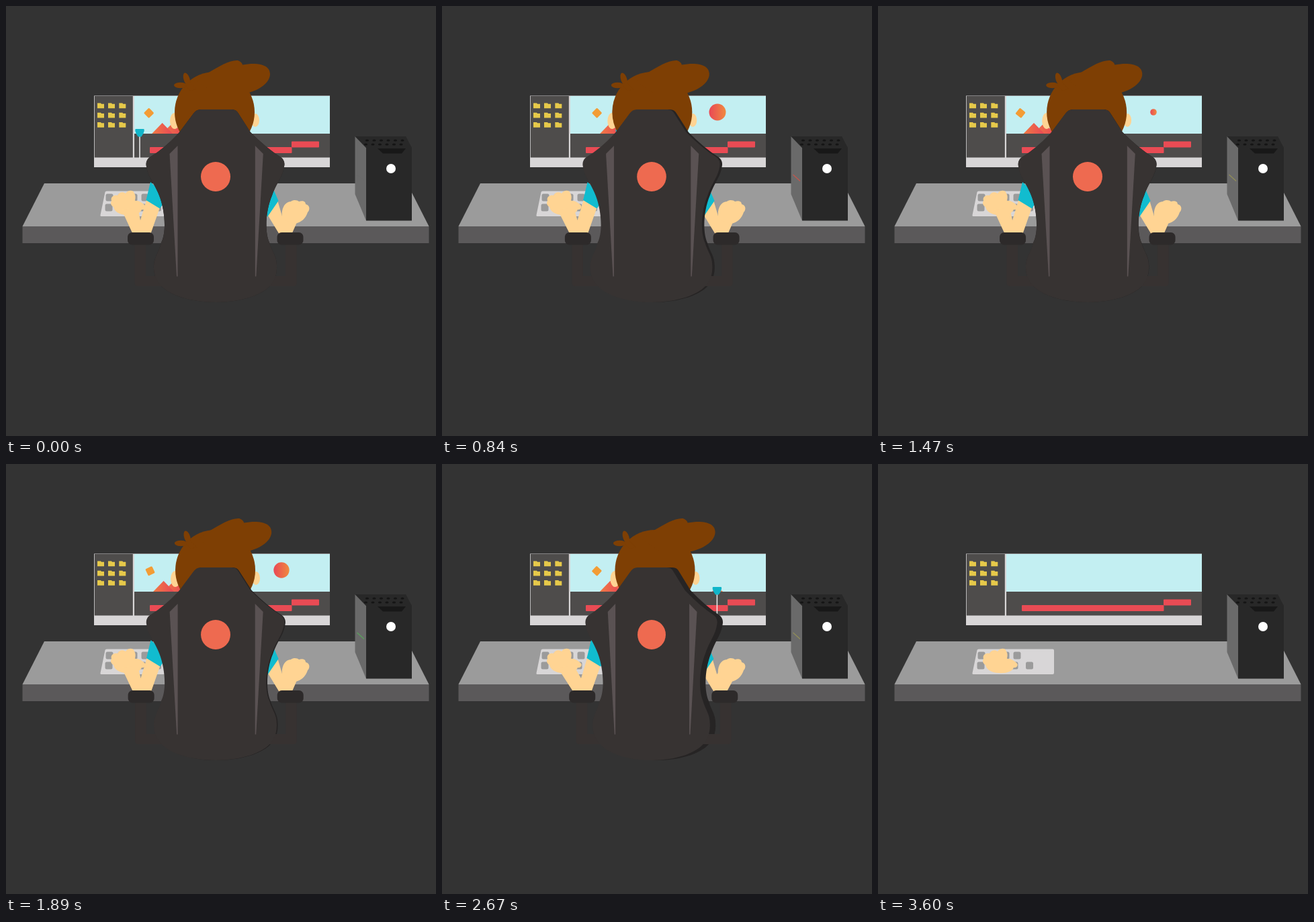
An HTML page that plays this animation: 640 px wide and 640 px high, repeating every 3.63 s.

```html
<!DOCTYPE html>
<html lang="en">
<head>
<meta charset="utf-8">
<title>At the desk</title>
<style>
  html, body { margin: 0; width: 100%; height: 100%; overflow: hidden; background: #333; }
  svg { display: block; width: 100vw; height: 100vh; }
</style>
</head>
<body>
<svg viewBox="0 0 640 640">
  <defs>
    <linearGradient id="warm">
      <stop offset="0" stop-color="#e94856"/>
      <stop offset="1" stop-color="#f08a40"/>
    </linearGradient>
    <linearGradient id="slope">
      <stop offset="0" stop-color="#f07a44"/>
      <stop offset="1" stop-color="#e94856"/>
    </linearGradient>
    <path id="seat" d="M290 154H336Q343 154 346 160L364 188Q388 212 409 225Q416 230 414 239C412 254 402 264 396 282C386 305 385 337 392 352C396 366 403 372 403 386Q404 402 396 413C384 430 350 441 312 441S240 430 228 413Q219 402 220 386C221 372 228 366 231 352C239 337 237 305 228 282C221 264 211 254 209 239Q207 230 214 225Q236 212 258 188L279 160Q283 154 290 154Z"/>
  </defs>
  <rect width="640" height="640" fill="#333"/>

  <!-- desk -->
  <path d="M57 264H597L629.5 328H24.5Z" fill="#9b9b9b"/>
  <path d="M24.5 328H629.5V353H24.5Z" fill="#5b595a"/>

  <!-- monitor -->
  <rect x="131" y="133.5" width="351" height="106.5" fill="#d8d6d7"/>
  <rect x="191" y="134" width="291" height="57" fill="#c3eff2"/>
  <g class="live">
    <circle id="sun" cx="410" fill="url(#warm)"/>
    <rect id="box" x="-5.5" y="-5.5" width="11" height="11" rx="1.5" fill="#f39c35"/>
    <g id="hills" fill="url(#slope)">
      <path d="M15 190L31 174L47 190Z"/>
      <path d="M0 190L15.5 174L31 190Z"/>
    </g>
  </g>
  <path d="M191 190H482V225.5H191Z" fill="#4e4c4b"/>
  <rect x="131.8" y="134" width="57" height="91.5" fill="#4e4c4b"/>
  <g id="files" fill="#e6c94a"></g>
  <rect x="214" y="210" width="211.5" height="9" rx="1" fill="#e94b54"/>
  <rect x="425" y="201.5" width="41" height="9" rx="1" fill="#e94b54"/>
  <g id="cursor" class="live">
    <path d="M0 190V227" stroke="#eee" stroke-width="1.5"/>
    <path d="M-6 183H6Q7 183 6.7 186Q6 190 2.5 194.5H-2.5Q-6 190 -6.7 186Q-7 183 -6 183Z" fill="#11b5c9"/>
  </g>

  <!-- keyboard -->
  <path d="M150 275.5H260Q262 275.5 262 277.5V311Q262 313 260 313H142Q140 313 140.5 311L147.5 277Q148 275.5 150 275.5Z" fill="#d8d6d7"/>
  <g id="keys" fill="#9b9b9b"></g>

  <!-- computer -->
  <path d="M519.5 194L536 211V319.5L519.5 280Z" fill="#6a6a6a"/>
  <path d="M519.5 194H595L604 211V319.5H536V211Z" fill="#282828"/>
  <g id="vents" fill="#151515"></g>
  <path d="M553 212H595L589 219.5H561Z" fill="#181818"/>
  <circle cx="573" cy="242" r="7" fill="#fff"/>
  <path id="led" class="live" d="M522.5 251L533 260.5" stroke-width="1.3"/>

  <path d="M157 290C155 283 162 281 166 282C168 277 174 276 178 279C181 274 190 273 191 279C194 283 192 288 192 290C197 289 203 293 207 297C209 300 206 304 202 303C200 309 190 312 180 311C168 311 161 305 160 299C156 297 155 293 157 290Z" fill="#ffd493"/>

  <!-- person and chair -->
  <g class="live">
    <g fill="#ffd493">
      <path id="armL"/>
      <path id="armR"/>
      <path d="M412 318C408 305 414 291 424 291C428 288 434 289 436 291C442 289 446 291 446 295C452 296 453 303 449 307C446 316 440 322 430 324Z"/>
    </g>
    <path id="sleeveL" d="M215 262L208.5 289L229 301.5L240 285Z" fill="#11bccf"/>
    <path id="sleeveR" d="M399 275L405.5 290L389 314L380 290Z" fill="#11bccf"/>

    <g id="head">
      <ellipse cx="251" cy="171" rx="7" ry="12" fill="#ffd493"/>
      <ellipse cx="371" cy="170" rx="6" ry="10" fill="#ffd493"/>
      <ellipse cx="310.5" cy="158" rx="59.5" ry="60" fill="#7e3f04"/>
    </g>
    <g id="tuft" fill="#7e3f04">
      <ellipse cx="259.5" cy="118" rx="9.5" ry="4.2"/>
      <ellipse cx="269" cy="109" rx="4.5" ry="10" transform="rotate(-18 269 109)"/>
      <path d="M266 116L274 114L284 124L274 126Z"/>
    </g>
    <path id="quiff" d="M284 112L300 100C318 89 334 80 345 81Q351 83 352 87.5C376 83 393 88 393 101C393 114 378 125 358 130L310 130Z" fill="#7e3f04"/>

    <use id="back" href="#seat" fill="#262424"/>
    <g id="restL">
      <path d="M191.5 350H208V402H240V417H196Q191.5 417 191.5 412Z" fill="#373231"/>
      <rect x="181" y="337" width="39" height="18.5" rx="6.5" fill="#2d2a2a"/>
    </g>
    <g id="restR">
      <path d="M432.5 350H416V402H384V417H428Q432.5 417 432.5 412Z" fill="#373231"/>
      <rect x="403.5" y="337" width="39" height="18.5" rx="6.5" fill="#2d2a2a"/>
    </g>
    <g id="front">
      <use href="#seat" fill="#373332"/>
      <path d="M243.5 220L255.5 208V402.5H254Z" fill="#5a5253"/>
      <path d="M382.8 220L370.8 208V402.5H372.3Z" fill="#5a5253"/>
      <circle cx="312" cy="254" r="22" fill="#ee6a50"/>
    </g>
  </g>
</svg>
<script>
const LOOP = 3630, STEP = 30, BLANK = 3600;
const $ = id => document.getElementById(id);
const live = document.querySelectorAll('.live');

// Small repeated parts
function add(parent, tag, attrs) {
  const el = document.createElementNS('http://www.w3.org/2000/svg', tag);
  for (const k in attrs) el.setAttribute(k, attrs[k]);
  $(parent).append(el);
}
for (const y of [144.5, 158.7, 173])
  for (const x of [136, 152, 168.3])
    add('files', 'path', { d: `M${x} ${y}h5l1 1.2h4v6.6h-10z` });
for (const [y, xs] of [[285, [154, 172, 190, 207]], [300, [153, 171, 187, 203, 225.5]]])
  for (const x of xs)
    add('keys', 'rect', { x: x - 5.5, y: y - 5.5, width: 11, height: 11, rx: 2.5 });
for (const [x, y] of [[537.5, 200], [535.5, 206]])
  for (let i = 0; i < 6; i++)
    add('vents', 'ellipse', { cx: x + i * 10.5, cy: y, rx: 2.6, ry: 1.5 });

// Key tables: [time, value, ...]
const TURN = [[0, 0], [450, .9], [1170, .03], [1600, .03], [2700, 1], [3180, -.7], [LOOP, 0]];
const SUN_R = [[0, 12.5], [1110, 12.5], [1470, 4.8], [2000, 12.5], [LOOP, 12.5]];
const SUN_Y = [[0, 204], [80, 204], [540, 158], [2300, 158], [2760, 204], [LOOP, 204]];
const LED = [[0, 106, 106, 106], [600, 196, 86, 76], [1000, 196, 86, 76], [1470, 145, 142, 88],
  [2080, 72, 168, 92], [2670, 145, 142, 88], [3180, 190, 84, 76], [LOOP, 106, 106, 106]];

const smooth = u => u * u * (3 - 2 * u);
function sample(keys, t) {
  const i = Math.max(1, keys.findIndex(k => k[0] >= t));
  const a = keys[i - 1], b = keys[i];
  const u = smooth((t - a[0]) / (b[0] - a[0]));
  return a.slice(1).map((v, j) => v + (b[j + 1] - v) * u);
}
const set = (id, name, value) => $(id).setAttribute(name, value);
const move = (id, x, extra = '') => set(id, 'transform', `translate(${x} 0)${extra}`);

function drawScreen(t) {
  const swing = Math.cos((t - 720) / (LOOP / 2) * 2 * Math.PI);
  const x = 221 + 10.5 * swing;
  set('box', 'transform', `translate(${x} 159.3) rotate(${105 * swing - 51})`);
  move('hills', x + 4.5);
  set('sun', 'r', sample(SUN_R, t)[0]);
  set('sun', 'cy', sample(SUN_Y, t)[0]);
  move('cursor', 199 + .0788 * t);
  set('led', 'stroke', `rgb(${sample(LED, t).map(Math.round)})`);
}

function drawPerson(t) {
  const [turn] = sample(TURN, t);
  const squeeze = 1 - .047 * turn * turn;
  const mid = 2 * turn + turn * turn;
  const left = mid + 111.5 * (1 - squeeze);
  const right = mid - 111.5 * (1 - squeeze);
  const head = 5 * turn + 1.5 * turn * turn;
  const scale = ` translate(312 0) scale(${squeeze} 1) translate(-312 0)`;

  move('head', head);
  move('tuft', head * .75);
  move('quiff', head * 2.1);
  move('front', 0, scale);
  move('back', turn * 8.4, scale);
  move('restL', left);
  move('restR', right);
  move('sleeveL', left * .85);
  move('sleeveR', right * .5);

  const l = x => x + left * .85, r = x => x + right * .8;
  set('armL', 'd', `M172 303L${l(189)} 340H${l(215)}L${l(229)} 300L${l(209)} 289L${l(200)} 319L196 300Z`);
  set('armR', 'd', `M${r(390)} 312L${r(404)} 289L${r(411)} 313L416 303L433 322L${r(425)} 340H${r(407)}Z`);
}

function frame(now) {
  const t = Math.floor(now % LOOP / STEP) * STEP;
  const shown = t < BLANK;
  live.forEach(el => el.style.display = shown ? '' : 'none');
  if (shown) {
    drawScreen(t);
    drawPerson(t);
  }
  requestAnimationFrame(frame);
}
const start = performance.now();
frame(0);
function tick(now) { return Math.max(0, now - start); }
</script>
</body>
</html>
```
